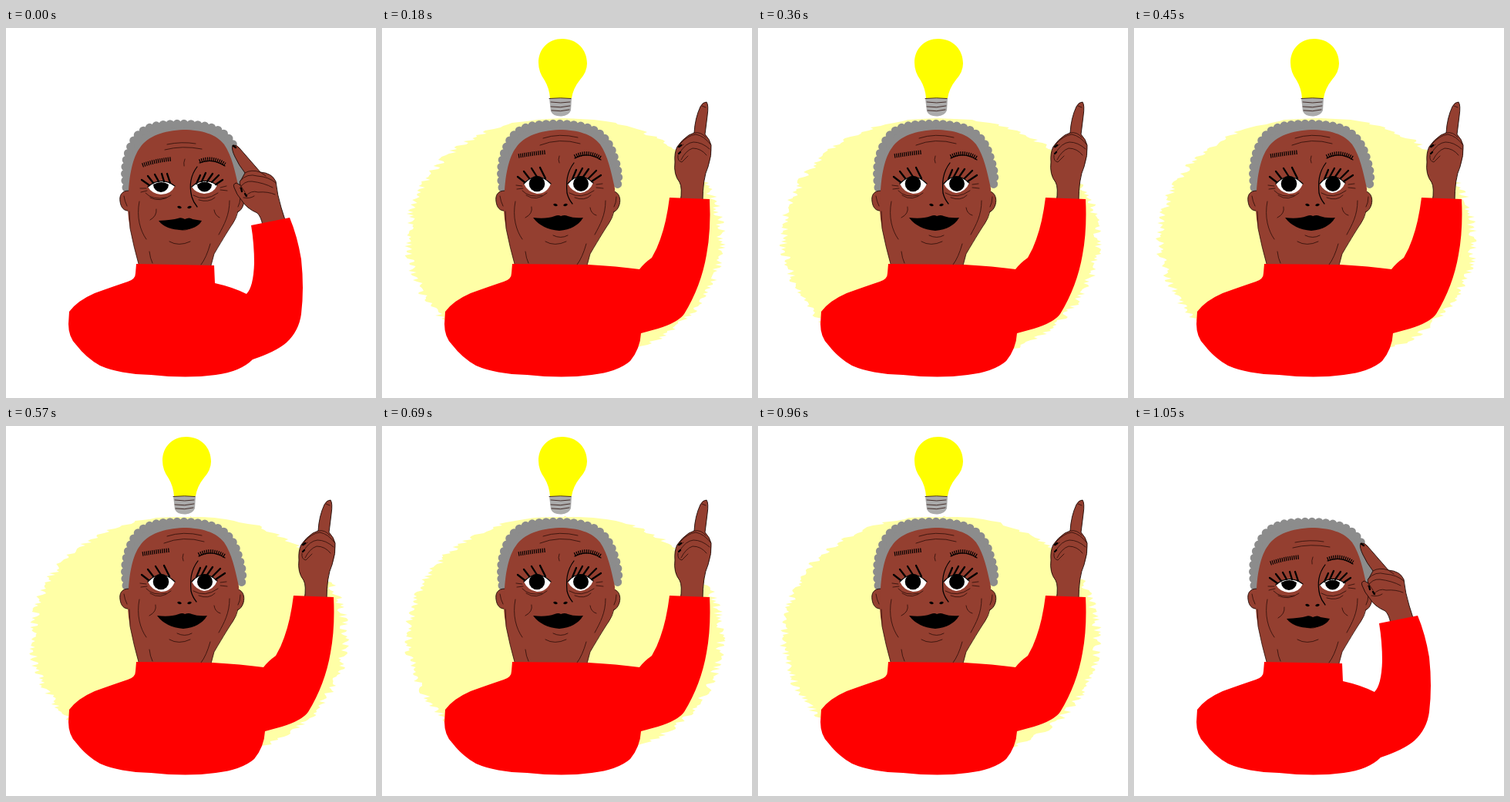
Animation, 480 px wide and 480 px high, one loop 1.32 s. Source, as an HTML page:

```html
<!DOCTYPE html>
<html lang="en">
<head>
<meta charset="utf-8">
<title>Bright idea</title>
<style>
  html, body { margin: 0; width: 100%; height: 100%; overflow: hidden; background: #fff; }
  svg { display: block; width: 100%; height: 100%; }
  .skin { fill: #943f30; }
  .outline { stroke: #1c0805; stroke-width: .9; stroke-linejoin: round; }
  .line { fill: none; stroke: #2a0d08; stroke-width: .8; stroke-linecap: round; }
  .bold { fill: none; stroke: #000; stroke-width: 1.2; stroke-linecap: round; }
  .lash { fill: none; stroke: #000; stroke-width: 2.3; stroke-linecap: round; }
  .brow { fill: none; stroke: #000; stroke-width: 5.5; stroke-dasharray: 1.2 1.4; }
  .curls { fill: #8c8c8c; stroke: #8c8c8c; stroke-width: 11; stroke-linecap: round; stroke-dasharray: 0 9; }
  .red { fill: #f00; }
  .white { fill: #fff; }
</style>
</head>
<body>
<svg viewBox="0 0 480 480">
  <path id="glow" fill="#ffffa6"/>

  <!-- head shared by both poses -->
  <path class="curls" d="M156 207C153 188 154 168 164 149C171 135 184 128 200 126C222 123 245 124 262 128C284 133 296 147 302 170C307 186 308 194 305 205"/>
  <path class="skin outline" d="M160 211C149 211 147 218 148 225C149 233 153 238 161 237ZM301 212C308 214 310 222 308 229C306 236 301 240 297 239Z"/>
  <path class="skin" d="M159 213C160 192 164 168 174 155C184 140 205 133 230 132C254 132 273 138 283 151C293 166 297 185 302 208V215Q303 241 294 254T270 293L266 308V312H172V306Q166 285 161 260Q156 235 159 213Z"/>
  <path class="line" d="M160 238L161 260Q166 285 172 306M301 238Q299 247 294 254T270 293L266 308M173 225C169 245 174 263 182 274M290 224C290 243 283 255 276 268M186 290Q187 299 190 305M265 280Q260 298 253 307M212 277Q224 284 239 277M153 218Q154 225 157 231M304 219Q304 227 301 232"/>

  <g id="rest">
    <path class="line" d="M209 151Q228 147 246 150M206 158Q229 152 254 157M232 170Q230 175 231 179M181 214Q190 224 208 220M187 220Q200 227 214 217M243 217Q258 226 275 214M250 223Q263 227 271 220M174 208L182 208M175 213L183 211M278 207L286 205M278 210L287 211M195 235Q196 244 187 249M270 236Q271 243 277 246M221 260Q229 264 236 261"/>
    <path class="brow" d="M177 178Q194 172 214 170M251 173Q268 166 284 177"/>
    <path class="bold" d="M251 175Q268 168 284 179M248 180C238 193 238 207 241 219Q243 226 248 232"/>
    <path class="white" d="M184 206Q201 191 219 205Q214 216 201 216Q189 215 184 206ZM241 206Q256 192 274 204Q269 215 257 215Q246 214 241 206Z"/>
    <path d="M191 203Q202 197 211 203A9.500 9.500 0 1 1 191 203ZM248 203Q258 196 267 203A9.500 9.500 0 1 1 248 203Z"/>
    <path class="bold" d="M184 206Q201 192 219 205M241 206Q256 192 274 204"/>
    <path class="lash" d="M186 204L176 197M191 201L184 192M198 199L193 190M205 199L202 189M213 201L209 189M247 202L252 191M254 199L259 188M261 199L268 189M267 200L276 191M272 203L281 197"/>
    <path d="M222 232Q225 229 228 233Q225 236 222 232ZM235 233Q238 229 241 232Q238 236 235 233Z"/>
    <path d="M198 250Q216 249 223 247Q227 245 232 248Q238 245 242 248L254 250Q248 261 229 262Q207 262 198 250Z"/>
    <path class="skin outline" d="M294 152Q299 151 303 156L330 187Q345 188 350 199Q352 217 357 233L363 252L333 256Q331 245 326 240Q312 234 306 224Q299 216 296 207Q294 202 299 201L304 204Q302 199 305 197L310 188Q302 178 297 167Q292 157 294 152Z"/>
    <path class="line" d="M310 188Q318 183 330 187L337 192M304 198Q313 188 326 192Q341 193 350 201M303 208Q309 198 319 199Q335 201 346 207M311 218Q318 210 327 213Q340 212 349 216M304 204L310 213M308 220Q316 222 322 218"/>
    <path class="lash" d="M305 208L306 212M310 215L312 218M295 153L298 155"/>
    <path class="red" d="M169 306L270 308L271 331Q294 336 312 345Q321 336 322 305Q322 280 318 256L368 246Q378 270 383 300Q387 338 383 371Q380 393 364 408Q350 420 320 430Q304 446 272 450Q235 455 188 450Q147 449 122 438Q104 428 91 411Q81 401 81 384L82 368Q92 354 115 344Q140 335 158 329Q168 326 168 318Z"/>
  </g>

  <g id="idea">
    <path class="line" d="M209 143Q230 136 254 142M205 152Q230 142 257 150M230 166Q228 171 230 175M182 211Q191 221 208 217M187 217Q200 226 214 214M243 214Q258 223 275 211M250 220Q263 225 271 217M174 204L182 205M175 209L183 208M278 203L286 202M278 207L287 208M194 232Q196 241 186 246M270 233Q271 241 278 243M222 269Q232 274 241 269"/>
    <path class="brow" d="M177 166Q194 163 213 161M250 167Q267 158 284 169"/>
    <path class="bold" d="M250 169Q267 160 284 171M249 175C239 188 239 201 240 214Q242 222 247 228"/>
    <path class="white" d="M184 202Q201 183 219 202Q214 215 201 215Q189 213 184 202ZM241 202Q256 184 274 201Q269 213 257 214Q246 212 241 202Z"/>
    <circle cx="201" cy="202" r="10.300"/><circle cx="258" cy="202" r="10"/>
    <path class="bold" d="M184 202Q201 184 219 202M241 202Q256 184 274 201"/>
    <path class="lash" d="M185 200L176 193M191 195L184 186M201 193L194 182M212 195L205 181M247 196L252 184M254 193L260 182M261 193L268 183M268 195L278 185M272 199L284 191"/>
    <path d="M222 229Q225 226 228 230Q225 233 222 229ZM235 230Q238 226 241 229Q238 233 235 230Z"/>
    <path d="M196 246Q213 248 224 244Q229 242 232 244Q237 242 241 244Q249 247 261 246Q252 261 230 263Q207 261 196 246Z"/>
    <path class="skin outline" d="M387 226Q390 207 386 200Q378 190 380 174Q379 162 383 154Q389 145 398 139L405 136Q406 117 413 102Q416 96 421 96Q424 100 422 114L419 138Q425 144 427 152Q428 165 423 180Q416 195 416 226Z"/>
    <path class="line" d="M405 136Q414 134 420 142M386 151Q397 139 407 138Q418 140 426 151M386 162Q394 149 404 148Q415 148 425 157M388 171Q394 159 403 156Q414 156 421 165M384 165Q383 173 389 174L397 166M386 155L391 151M415 101L420 103"/>
    <path class="lash" d="M385 154L388 152M385 163L387 161"/>
    <path class="red" d="M169 306L268 307Q305 309 334 313Q340 305 350 298Q357 286 361 274Q369 252 373 220L425 222Q427 262 421 294Q414 335 392 371Q384 382 358 390L336 396Q335 416 322 432Q306 446 272 450Q235 455 188 450Q147 449 122 438Q104 428 91 411Q81 401 81 384L82 368Q92 354 115 344Q140 335 158 329Q168 326 168 318Z"/>
    <path fill="#ff0" d="M218 91Q217 78 211 68Q203 57 203 45C203 27 216 14 234 14C253 14 266 28 266 46Q266 57 257 67Q248 78 246 91Z"/>
    <path fill="#ababab" d="M217 91H246L245 107Q242 114 233 114.500Q222 115 219 108Z"/>
    <path class="line" d="M217 91.500Q232 90 245 91.500M219 96Q232 98 244 96M219 102Q232 104 244 101M220 107Q232 109 243 106"/>
  </g>
</svg>
<script>
  const LOOP = 1320, STEP = 30, IDEA_START = 180, IDEA_END = 1050;
  const [glow, rest, idea] = ["glow", "rest", "idea"].map(id => document.getElementById(id));

  function randomFrom(seed) {
    return () => {
      seed = Math.imul(seed ^ (seed >>> 15), 1597334677) + 1013904223 | 0;
      return ((seed ^ (seed >>> 13)) >>> 0) / 4294967296;
    };
  }

  // An ellipse whose sides are frayed into horizontal teeth.
  function glowPath(step) {
    const random = randomFrom(step * 7919 + 17);
    const cx = 237, cy = 274, rx = 203, ry = 157;
    const left = [], right = [];
    for (let y = cy - ry; y <= cy + ry; y += 2) {
      const half = rx * Math.pow(1 - ((y - cy) / ry) ** 2, .45);
      const fray = () => (random() - .5) * 13;
      left.push(`${Math.max(27, cx - half + fray()).toFixed(1)} ${y}`);
      right.unshift(`${Math.min(450, cx + half + fray()).toFixed(1)} ${y}`);
    }
    return `M${left.concat(right).join("L")}Z`;
  }

  let shown = -1;
  function draw(now) {
    const step = Math.floor(now % LOOP / STEP);
    if (step !== shown) {
      shown = step;
      const lit = step * STEP >= IDEA_START && step * STEP < IDEA_END;
      rest.style.display = lit ? "none" : "";
      idea.style.display = glow.style.display = lit ? "" : "none";
      if (lit) glow.setAttribute("d", glowPath(step));
    }
    requestAnimationFrame(() => draw(performance.now() - start));
  }
  const start = performance.now();
  draw(0);
</script>
</body>
</html>
```
